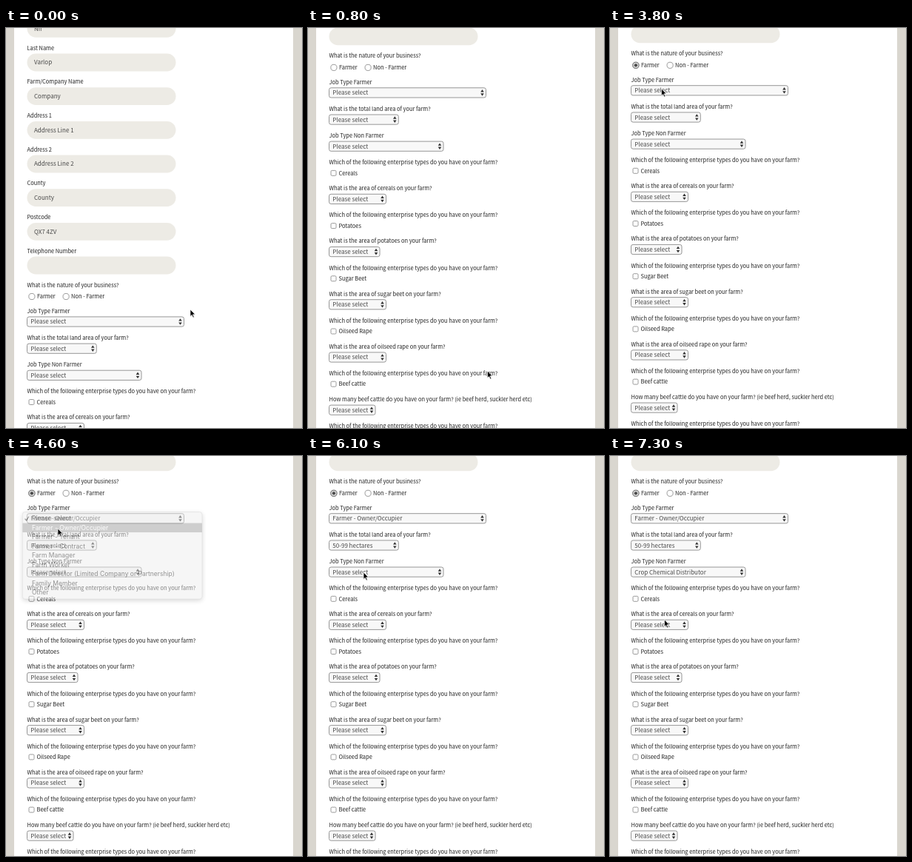
Animation, 400 px wide and 540 px high, one loop 7.4 s. Source, as an HTML page:

```html
<!DOCTYPE html>
<html lang="en">
<head>
<meta charset="utf-8">
<title>Farm registration form</title>
<style>
  html, body { margin: 0; width: 100%; height: 100%; overflow: hidden; background: #d9d6cf; }
  svg { display: block; }
  text { font: 7.44px "Noto Sans CJK JP", "Noto Sans CJK SC", "Noto Sans", sans-serif; fill: #222; white-space: pre; }
  .field { font-size: 8px; fill: #484848; }
  .box { fill: #f8f8f8; stroke: #8c8c8c; stroke-width: .9; }
  .tick { fill: #fff; stroke: #808080; stroke-width: .8; }
  .menu { filter: drop-shadow(0 2px 3px rgba(0, 0, 0, .32)); }
  .menu text { font: 8.5px Inter, Roboto, sans-serif; fill: #1c1c1c; }
  .menu .on { fill: #fff; }
  .check { fill: none; stroke: #1c1c1c; stroke-width: 1.1; }
</style>
</head>
<body>
<svg id="stage" width="400" height="540" viewBox="0 0 400 540"></svg>
<script>
const LOOP = 7400, STEP = 100, ROW = 12.5, SCROLL = 312.2, FADE = 200;

const text = (x, y, s, cls = '') => `<text x="${x}" y="${y}" class="${cls}">${s}</text>`;
const label = (y, s, x = 28.5) => text(x, y + 2.8, s);

const input = (y, name, value) => label(y - 19.5, name) +
  `<rect x="28.5" y="${y - 11.9}" width="201" height="23.8" rx="11.9" fill="#edebe5"/>` +
  text(38, y + 3, value, 'field');

function select(y, right, id = '') {
  const x = right - 5;
  return `<rect class="box" x="28.5" y="${y - 6.6}" width="${right - 28.5}" height="13.2" rx="2.6"/>
    <path fill="#333" d="M${x - 2.3} ${y - .9}h4.6l-2.3-3.4zM${x - 2.3} ${y + .9}h4.6l-2.3 3.4z"/>
    <text x="33.3" y="${y + 3}" class="field" id="${id}">Please select</text>`;
}

const radio = (x, y, name, id) =>
  `<circle class="tick" cx="${x}" cy="${y}" r="4.1"/>
   <g id="${id}"><circle cx="${x}" cy="${y}" r="4.1" fill="#d8d8d8" stroke="#6c6c6c" stroke-width=".9"/>
   <circle cx="${x}" cy="${y}" r="2.1" fill="#484848"/></g>` + label(y, name, x + 7);

const enterprise = (y, name, question, right) =>
  label(y, 'Which of the following enterprise types do you have on your farm?') +
  (name ? `<rect class="tick" x="31" y="${y + 11}" width="7" height="7" rx="1.4"/>` + label(y + 14.5, name, 41.5) +
    label(y + 35.1, question) + select(y + 49.5, right) : '');

const menus = [
  { y: 84.3, right: 265, open: 3900, close: 4495, pick: 1, items: ['Farmer - Owner/Occupier', 'Farmer - Tenant',
    'Farmer - Contract', 'Farm Manager', 'Farm Worker', 'Farm Director (Limited Company or Partnership)',
    'Family Member', 'Other'] },
  { y: 120.5, right: 137.5, open: 5300, close: 5795, pick: 2, items: ['Less than 50 hectares', '50-99 hectares',
    '100-199 hectares', '200-499 hectares', '500-999 hectares', '1000 hectares +'] },
  { y: 156.6, right: 200.5, open: 6300, close: 6795, pick: 3, items: ['Agricultural Merchant', 'Seed Merchant/seedsman',
    'Crop Chemical Distributor', 'Crop Advice/Consultancy', 'Animal Health/Nutrition', 'Farm Machinery Dealer',
    'Farm Management Adviser', 'OVEK/BRU', 'Merchant Co-operative', 'Animal Feed Manufacturer/Distributor',
    'Crop Chemical Manufacturer', 'Farm Co-operative', 'Farm Contractor', 'Fertiliser Manufacturer/Distributor',
    'Educational Establishment', 'Agricultural engineer', 'Veterinary Practice', 'Farm Accountant', 'Secretary', 'Other'] },
];
menus.forEach(m => m.items.unshift('Please select'));

const menu = ({ y, right, items }, i) => `<g class="menu" id="menu${i}">
  <rect x="22.3" y="${y - 8.7}" width="${right - 22.3}" height="${items.length * ROW + 5}" rx="3.5"
    fill="#ededed" stroke="#b9b9b9" stroke-width=".6"/>
  <rect class="bar" x="22.3" width="${right - 22.3}" height="${ROW}" fill="#9a9a9a"/>
  <path class="check" d="M25.6 ${y + .3}l1.9 2.5 3.3-5.4"/>
  ${items.map((s, k) => text(35, y + k * ROW + 3.1, s)).join('')}</g>`;

// Form laid out as it stands after scrolling
const fields = [['First Name', 'Nif'], ['Last Name', 'Varlop'], ['Farm/Company Name', 'Company'],
  ['Address 1', 'Address Line 1'], ['Address 2', 'Address Line 2'], ['County', 'County'],
  ['Postcode', 'QX7 4ZV'], ['Telephone Number', '']];
const form = fields.map(([name, value], i) => input(8.3 - (7 - i) * 45.67, name, value)).join('') +
  label(34.6, 'What is the nature of your business?') +
  radio(34.9, 50.3, 'Farmer', 'farmer') + radio(81.1, 50.3, 'Non - Farmer', 'other') +
  label(69.7, 'Job Type Farmer') + select(84.3, 240.5, 'value0') +
  label(105.9, 'What is the total land area of your farm?') + select(120.5, 122.3, 'value1') +
  label(142, 'Job Type Non Farmer') + select(156.6, 183, 'value2') +
  [['Cereals', 'What is the area of cereals on your farm?', 105.5],
   ['Potatoes', 'What is the area of potatoes on your farm?', 97],
   ['Sugar Beet', 'What is the area of sugar beet on your farm?', 105.5],
   ['Oilseed Rape', 'What is the area of oilseed rape on your farm?', 105.5],
   ['Beef cattle', 'How many beef cattle do you have on your farm? (ie beef herd, suckler herd etc)', 91],
   []].map((e, i) => enterprise(178.3 + i * 71.2, ...e)).join('');

const $ = id => document.getElementById(id);
$('stage').innerHTML = `<rect width="400" height="540" fill="#d9d6cf"/>
  <rect x="11" width="377" height="540" fill="#fff"/>
  <g id="form">${form}</g>${menus.map(menu).join('')}
  <path id="cursor" d="M0 0V9.4L2.2 7.4 3.8 11 5.3 10.4 3.7 6.8H6.7Z" fill="#000" stroke="#fff" stroke-width=".7"/>`;
$('other').remove();

// Pointer stops: time, x, y
const stops = [[0, 249, 380], [600, 249, 380], [1000, 236, 546], [1700, 203, 548], [1800, 200, 537],
  [2200, 86, 190], [2400, 46, 85], [2500, 56, 67], [2800, 38, 49], [3200, 38, 49], [3700, 69.5, 82],
  [4000, 69.5, 82], [4300, 70, 98], [4600, 70, 98], [5200, 73, 119], [5300, 73, 121], [5500, 73.5, 145],
  [5600, 74, 147], [5800, 74, 147], [6100, 75, 157], [6200, 75, 157], [6600, 76, 190], [6800, 76, 190],
  [7300, 73.5, 221], [LOOP, 73.5, 221]];

function pointer(t) {
  const i = stops.findIndex(s => s[0] > t);
  const [t0, x0, y0] = stops[i - 1], [t1, x1, y1] = stops[i];
  const p = (t - t0) / (t1 - t0), e = p * p * (3 - 2 * p);
  return [x0 + (x1 - x0) * e, y0 + (y1 - y0) * e];
}

function draw(t) {
  const [x, y] = pointer(t);
  const left = (1 - Math.min(t / 1000, 1)) ** 2.87;
  $('form').setAttribute('transform', `translate(0 ${SCROLL * left})`);
  $('cursor').setAttribute('transform', `translate(${x} ${y})`);
  $('farmer').style.display = t >= 2900 ? '' : 'none';
  menus.forEach((m, i) => {
    const el = $('menu' + i), done = t >= m.close;
    const alpha = t < m.open ? 0 : Math.max(0, Math.min(1, (m.close + FADE - t) / FADE));
    $('value' + i).textContent = m.items[done ? m.pick : 0];
    el.style.display = alpha ? '' : 'none';
    el.style.opacity = alpha;
    const row = done ? m.pick : Math.max(0, Math.min(m.pick, Math.floor((y - m.y) / ROW + .5)));
    el.querySelector('.bar').setAttribute('y', m.y + (row - .5) * ROW);
    el.querySelector('.check').style.stroke = row ? '' : '#fff';
    el.querySelectorAll('text').forEach((s, k) => s.classList.toggle('on', k === row));
  });
}

const start = performance.now();
function tick() {
  const t = (performance.now() - start) % LOOP;
  draw(Math.floor(t / STEP) * STEP);
  requestAnimationFrame(tick);
}
tick();
</script>
</body>
</html>
```
